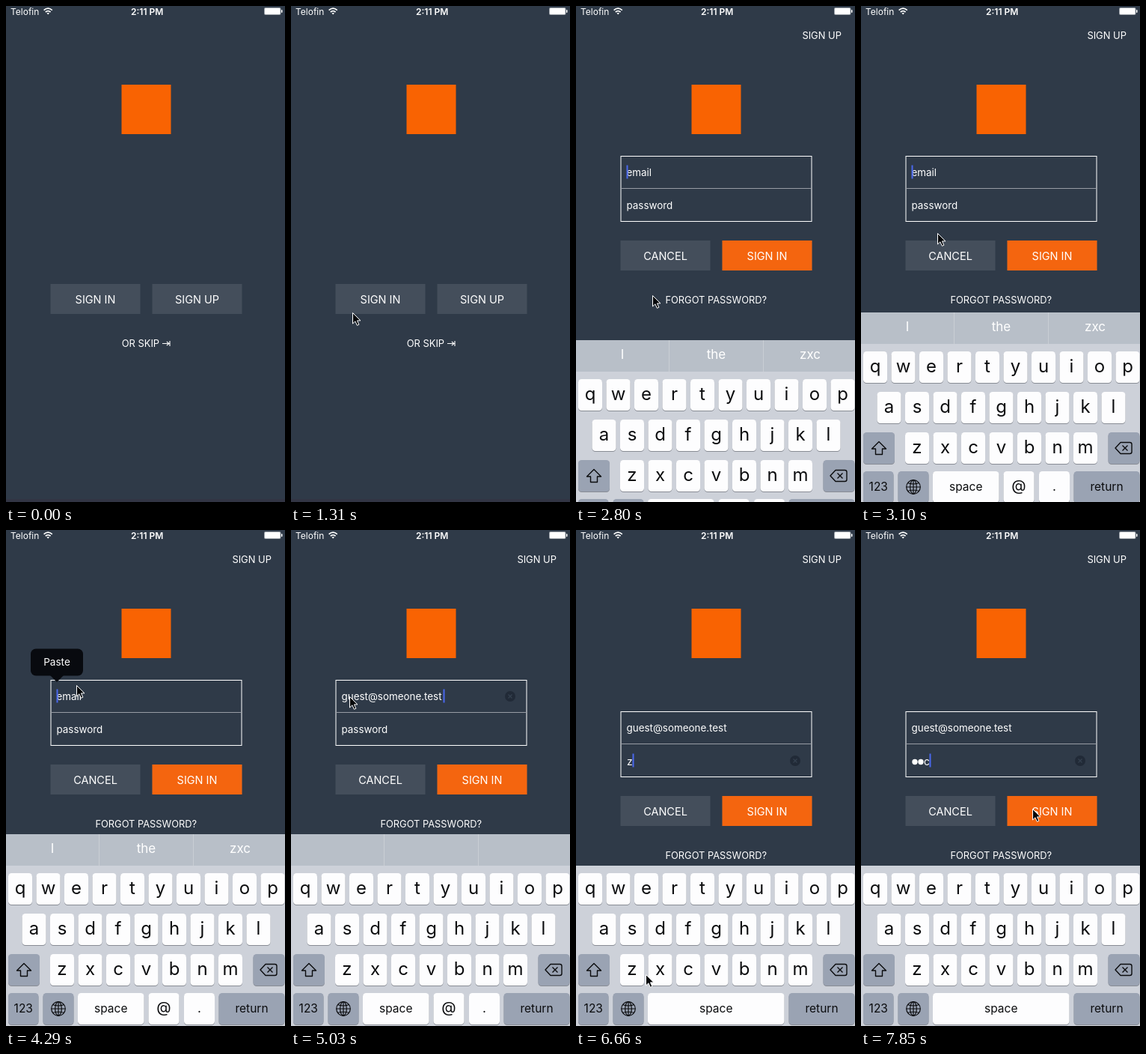
Recreate the animation shown at these times as an HTML page. Size 373 px wide and 662 px high, loop 8 s.

```html
<!DOCTYPE html>
<html lang="en">
<head>
<meta charset="utf-8">
<title>Sign-in screen</title>
<style>
html, body { margin: 0; width: 100%; height: 100%; overflow: hidden; background: #2f3a48; }
svg { display: block; width: 373px; height: 662px; font-family: Inter, Roboto, sans-serif; fill: #fff; }
text { white-space: pre; }
.line { fill: none; stroke: #fff; }
.icon { fill: none; stroke: #0b0c0e; stroke-width: 1.4; stroke-linejoin: round; }
</style>
</head>
<body>
<svg id="stage" viewBox="0 0 373 662"></svg>
<script>
const rect = (x, y, w, h, fill, more = '') =>
  `<rect x="${x}" y="${y}" width="${w}" height="${h}" fill="${fill}" ${more}/>`;
const label = (s, x, y, size, more = '') =>
  `<text x="${x}" y="${y}" font-size="${size}" ${more}>${s}</text>`;
const mid = (s, x, y, size, more = '') => label(s, x, y, size, 'text-anchor="middle" ' + more);
const group = (id, body) => `<g id="${id}">${body}</g>`;

// Keyboard, drawn at its resting place
const cap = (x, y, w, fill = '#fdfdfe') =>
  rect(x, y + 1, w, 42, '#888c94', 'rx="4.5"') + rect(x, y, w, 42, fill, 'rx="4.5"');
const key = (s, x, y, w, size = 24, fill) =>
  cap(x, y, w, fill) + mid(s, x + w / 2, y + (size > 20 ? 28 : 26), size, 'fill="#0b0c0e"');
const row = (letters, x, y) => [...letters].map((c, i) => key(c, x + 37.5 * i, y, 32)).join('');
const gray = '#9aa3b3';

const keyboard =
  group('hints', rect(0, 406, 373, 42, '#b8bfc8') +
    rect(124, 406, 1, 42, '#c9ced5') + rect(250, 406, 1, 42, '#c9ced5') +
    group('words', mid('I', 62, 431, 17) + mid('the', 187.5, 431, 17) + mid('zxc', 313, 431, 17))) +
  rect(0, 448, 373, 214, '#cdd1d9') +
  row('qwertyuiop', 3, 458) + row('asdfghjkl', 21.5, 512) + row('zxcvbnm', 59, 566) +
  cap(3, 566, 42, gray) + cap(330.5, 566, 42, gray) +
  key('123', 3, 618, 40.5, 15.5, gray) + cap(49.5, 618, 41, gray) +
  key('return', 284.5, 618, 88, 15.5, gray) +
  group('mailKeys', key('space', 96, 618, 88.5, 15.5) + key('@', 190.5, 618, 41, 20) + key('.', 238, 618, 41, 17)) +
  group('wideSpace', key('space', 96, 618, 182.5, 15.5)) +
  `<path class="icon" d="M24 578.500L33.500 588H28.500V595.500H19.500V588H14.500Z
    M347 579.500H359.500Q362 579.500 362 582V592Q362 594.500 359.500 594.500H347L340 587Z
    M349.500 583.500L356.500 590.500M356.500 583.500L349.500 590.500"/>
  <g class="icon" style="stroke-width:1.2"><circle cx="70" cy="639" r="9.3"/><ellipse cx="70" cy="639" rx="4.3" ry="9.3"/>
    <path d="M70 629.700V648.300M60.700 639H79.300M62.500 633.500Q70 636.500 77.500 633.500M62.500 644.500Q70 641.500 77.500 644.500"/></g>`;

const clear = (id, y) => group(id, `<circle cx="293" cy="${y}" r="7" fill="#212a37"/>
  <path class="line" style="stroke:#34404f;stroke-width:1.3" d="M290.500 ${y - 2.5}l5 5m0 -5l-5 5"/>`);

document.getElementById('stage').innerHTML =
  rect(0, 0, 373, 662, '#2f3a48') + rect(0, 658, 373, 4, '#323544') +
  // Status bar
  label('Telofin', 6, 11.5, 12) + mid('2:11 PM', 188.7, 11.5, 12, 'font-weight="600"') +
  `<path class="line" stroke-width="1.7" d="M50.600 5.600Q56.200 .8 61.800 5.600M52.800 8Q56.200 5.200 59.600 8"/>
  <path d="M54.400 9.600Q56.200 8.200 58 9.600L56.200 11.500Z"/>` +
  rect(345, 2, 22.5, 10, '#9da3aa', 'rx="2"') + rect(346, 3, 20.5, 8, '#fff', 'rx="1"') +
  rect(368, 5, 1.5, 4, '#fff', 'rx="0.7"') +
  rect(154.5, 105, 66, 66, '#f96302') +
  // Form
  group('signUp', label('SIGN UP', 302.4, 43.7, 12.9)) +
  group('fields', rect(60, 368.5, 255, 87, 'none', 'stroke="#fff"') + rect(60, 411, 255, 1, '#979ca4') +
    `<text id="email" x="67.500" y="395" font-size="13.4"></text>` +
    group('hint', label('password', 67.5, 439, 13.4)) +
    group('secret', `<circle id="dot0" cx="72" cy="435.500" r="3.700"/><circle id="dot1" cx="80" cy="435.500" r="3.700"/>
      <text id="char" y="439.500" font-size="13.8"></text>`) +
    clear('clear1', 390) + clear('clear2', 434) +
    rect(67.5, 380.5, 2, 18, '#4a68ee', 'id="caret"')) +
  group('buttons', rect(59.5, 371, 120, 40, '#444e5b') + rect(195.5, 371, 120, 40, '#444e5b') +
    group('home', mid('SIGN IN', 119.5, 396.5, 14.5) + mid('SIGN UP', 255.5, 396.5, 14.5) +
      label('OR SKIP', 154.7, 454.7, 12.9) +
      '<path class="line" stroke-width="1.1" d="M209 450.500H218M214.800 447.800L218 450.500L214.800 453.200M219 447V454"/>') +
    group('login', rect(195.5, 371, 120, 40, '#f4650f') +
      mid('CANCEL', 119.5, 396.5, 14.5) + mid('SIGN IN', 255.5, 396.5, 14.5) +
      mid('FORGOT PASSWORD?', 187.3, 454.7, 12.85))) +
  group('board', keyboard) +
  group('paste', rect(33, 158.5, 70, 36, '#080a0f', 'rx="7"') +
    '<path fill="#080a0f" d="M59 194L68 203L77 194Z"/>' + mid('Paste', 68, 181, 13.6)) +
  '<path id="cursor" fill="#05070a" stroke="#fff" stroke-width="1" d="M.5 .5V15L3.900 11.800L6.400 17.300L8.900 16.200L6.500 10.900H11Z"/>';

const $ = id => document.getElementById(id);
const show = (id, on) => $(id).setAttribute('opacity', +on);
const move = (id, x, y) => $(id).setAttribute('transform', `translate(${x} ${y})`);
const clamp = v => Math.min(1, Math.max(0, v));
const smooth = v => v * v * (3 - 2 * v);

// The screen refreshes in bursts: start, end, refresh count
const bursts = [[450, 1460, 8], [1610, 2650, 8], [2800, 3400, 5], [3700, 4730, 8],
  [4880, 5180, 3], [5470, 6510, 8], [6660, 6960, 3], [7410, 7850, 4]];
const ticks = [0];
for (const [a, b, n] of bursts)
  for (let i = 0; i < n; i++) ticks.push(Math.floor((a + (b - a) * i / (n - 1)) / 10) * 10);

// Cursor path: time, x, y
const path = [[450, 52, 490], [1310, 82, 409], [1460, 95, 398], [1610, 97, 396], [2500, 101, 391],
  [2800, 102, 386], [3400, 101, 219], [3700, 101, 217], [4280, 94, 207], [4730, 73, 177],
  [4880, 73, 178], [5180, 82, 266], [5470, 85, 341], [6360, 74, 588], [6510, 74, 591],
  [6810, 112, 595], [6960, 150, 598], [7410, 150, 598], [7850, 229, 372]];

function cursorAt(t) {
  const i = path.findIndex(p => p[0] > t);
  if (i < 0) return path[path.length - 1].slice(1);
  if (i === 0) return path[0].slice(1);
  const [t0, x0, y0] = path[i - 1], [t1, x1, y1] = path[i];
  const k = smooth((t - t0) / (t1 - t0));
  return [x0 + (x1 - x0) * k, y0 + (y1 - y0) * k].map(Math.round);
}

function draw(t) {
  const open = smooth(clamp((t - 1700) / 400));
  const lift = t < 2650 ? 0 : t < 5470 ? -168 : -126;
  const pasted = t >= 4880, onPassword = t >= 5470;
  const typed = [6510, 6810, 7410].filter(at => t >= at).length;

  for (const id of ['signUp', 'fields', 'login']) show(id, open);
  show('home', 1 - open);
  move('fields', 0, lift);
  move('buttons', 0, 110 * open + lift);

  $('email').textContent = pasted ? 'guest@someone.test' : 'email';
  show('hint', !typed);
  show('secret', typed);
  show('dot0', typed > 1);
  show('dot1', typed > 2);
  $('char').textContent = 'zxc'[typed - 1] || '';
  $('char').setAttribute('x', 60 + 8 * typed);
  show('clear1', pasted && !onPassword);
  show('clear2', typed);
  show('caret', t >= 2800 && t !== 5470);
  if (onPassword) move('caret', 8 * typed, 44);
  else move('caret', pasted ? 136 : 0, 0);

  const drop = t < 2650 ? 256 : t < 3400 ? 256 * Math.exp((2590 - t) / 113) : 0;
  move('board', 0, Math.round(drop));
  show('hints', !onPassword);
  show('words', !pasted);
  show('mailKeys', !onPassword);
  show('wideSpace', onPassword);
  show('paste', t >= 3850 && !pasted);

  show('cursor', t >= 450);
  move('cursor', ...cursorAt(t));
}

function frame(now) {
  const t = now % 8000;
  draw(ticks.filter(k => k <= t).pop());
  requestAnimationFrame(frame);
}
frame(0);
</script>
</body>
</html>
```
